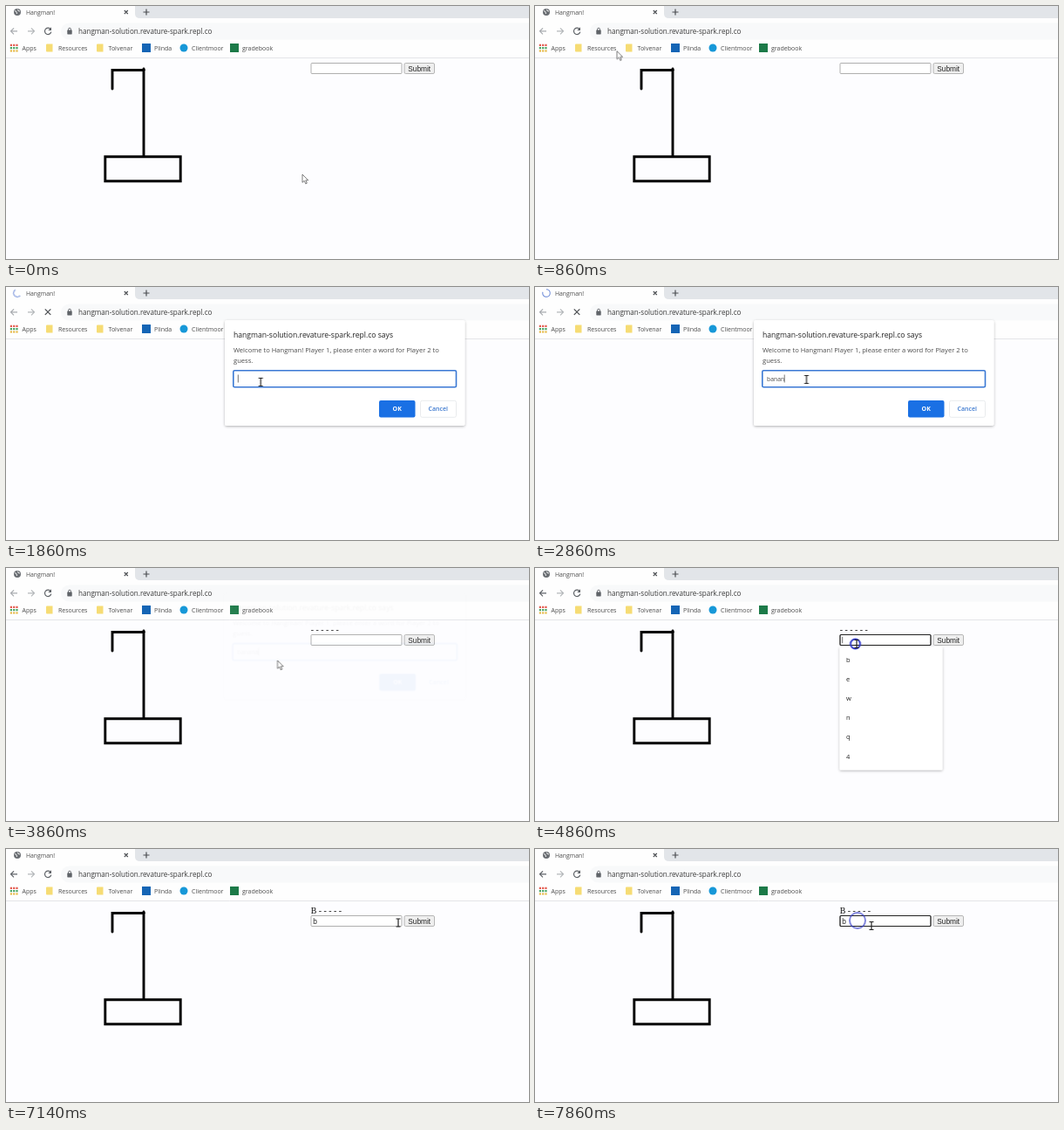
An HTML page for the animation above (8000 ms loop, 600x290 px).

```html
<!DOCTYPE html>
<html lang="en">
<head>
<meta charset="utf-8">
<title>Hangman!</title>
<style>
html, body { margin: 0; width: 100%; height: 100%; overflow: hidden; background: #fdfdff; }
svg { display: block; width: 600px; height: 290px; }
text { font-family: "Open Sans", "Noto Sans", sans-serif; font-size: 7px; fill: #4c4c4c; white-space: pre; }
.line { fill: none; stroke: #5f6368; stroke-width: 1.2; }
.arial { font: 8.3px "Liberation Sans", Arial, sans-serif; fill: #222; }
.serif { font: 9.9px "Liberation Serif", Times, serif; fill: #111; }
.small { font-size: 7.5px; fill: #222; }

/* 56 steps of 1/7 s; hard changes unless a keyframe says otherwise */
.a { animation: 8s step-end infinite both; }
.idle { animation-name: idle; }
.busy { animation-name: busy; }
.page { animation-name: page; }
.form { animation-name: form; }
.back { animation-name: back; }
.dashes { animation-name: dashes; }
.hit { animation-name: hit; }
.focus { animation-name: focus; }
.menu { animation-name: menu; }
.guess { animation-name: guess; }
.hover { animation-name: hover; }
.press { animation-name: press; }
.dialog { animation-name: dialog; transform-origin: 389px 98px; }
.ok { animation-name: ok; }
.key { animation-name: key; animation-delay: calc(var(--i) * .142s); }
.caret { animation-name: caret; }
.spin { animation-name: spin; animation-timing-function: steps(56); transform-origin: 13px 7px; }
.arc { animation-name: arc; }
.mouse { animation-name: mouse; }
.arrow { animation-name: arrow; }
.beam { animation-name: beam; }
.ring { animation-name: ring; }

@keyframes idle { 0% { visibility: visible } 14.25% { visibility: hidden } 48.25%, 100% { visibility: visible } }
@keyframes busy { 0% { visibility: hidden } 14.25% { visibility: visible } 48.25%, 100% { visibility: hidden } }
@keyframes page { 0% { visibility: visible } 16.125% { visibility: hidden } 48.25%, 100% { visibility: visible } }
@keyframes form { 0% { transform: translateY(-11px) } 48.25%, 100% { transform: none } }
@keyframes back { 0% { stroke: #a8abaf } 57.125%, 100% { stroke: #5f6368 } }
@keyframes dashes { 0% { visibility: hidden } 48.25% { visibility: visible } 85.75%, 100% { visibility: hidden } }
@keyframes hit { 0% { visibility: hidden } 85.75%, 100% { visibility: visible } }
@keyframes focus {
  0% { visibility: hidden } 60.75% { visibility: visible }
  83.875% { visibility: hidden } 96.375%, 100% { visibility: visible }
}
@keyframes menu { 0% { visibility: hidden } 60.75% { visibility: visible } 67.875%, 100% { visibility: hidden } }
@keyframes guess { 0% { visibility: hidden } 67.875%, 100% { visibility: visible } }
@keyframes hover { 0% { fill: #efefef } 75% { fill: #e2e2e2 } 87.5%, 100% { fill: #efefef } }
@keyframes press { 0% { opacity: 0 } 12.5% { opacity: .1 } 17.875%, 100% { opacity: 0 } }
@keyframes dialog {
  0% { opacity: 0; transform: none }
  16.125% { opacity: .53; transform: translateY(-5px) scale(1.006) }
  17.875% { opacity: 1; transform: none }
  46.375% { opacity: .45; transform: translateY(-4px) }
  48.25% { opacity: .05; transform: translateY(-9px) scale(1.006) }
  50%, 100% { opacity: 0; transform: none }
}
@keyframes ok { 0% { fill: #1a70e4 } 42.875%, 100% { fill: #1a64cc } }
@keyframes key { 0% { visibility: hidden } 28.625%, 100% { visibility: visible } }
@keyframes caret {
  0% { transform: none }
  26.75% { transform: none; animation-timing-function: steps(6) }
  37.5%, 100% { transform: translateX(23.8px) }
}
@keyframes spin { from { transform: rotate(-24.5deg) } to { transform: rotate(1808deg) } }
@keyframes arc {
  0% { stroke-dasharray: 11 30 }
  16.125% { stroke-dasharray: 11 30; animation-timing-function: steps(11) }
  35.75% { stroke-dasharray: 21 30; animation-timing-function: steps(7) }
  48.25%, 100% { stroke-dasharray: 11 30 }
}
@keyframes mouse {
  0% { transform: translate(340px, 193px); animation-timing-function: steps(7) }
  12.5% { transform: translate(53px, 28px) }
  16.125% { transform: translate(215px, 120.500px); animation-timing-function: steps(5) }
  25% { transform: translate(311.5px, 106px) }
  53.625% { transform: translate(311.5px, 106px); animation-timing-function: steps(4) }
  60.75% { transform: translate(369px, 87px); animation-timing-function: steps(2) }
  64.25% { transform: translate(475px, 93px) }
  66.125% { transform: translate(475px, 93px); animation-timing-function: steps(6) }
  76.75% { transform: translate(466px, 85px) }
  85.75% { transform: translate(466px, 85px); animation-timing-function: steps(6) }
  96.375% { transform: translate(370px, 82px) }
  98.25%, 100% { transform: translate(386px, 88px) }
}
@keyframes beam {
  0% { visibility: hidden } 21.375% { visibility: visible } 46.375% { visibility: hidden }
  60.75% { visibility: visible } 62.5% { visibility: hidden } 87.5%, 100% { visibility: visible }
}
@keyframes arrow {
  0% { visibility: visible } 21.375% { visibility: hidden } 46.375% { visibility: visible }
  60.75% { visibility: hidden } 62.5% { visibility: visible } 87.5%, 100% { visibility: hidden }
}
@keyframes ring {
  0% { opacity: 0 }
  14.25% { opacity: 1; r: 5.5px; transform: translate(53px, 28px) }
  16.125% { opacity: .6; r: 9px; transform: translate(52.5px, 28px) }
  17.875% { opacity: 0 }
  60.75% { opacity: 1; r: 5.5px; transform: translate(367.5px, 87px) }
  62.5% { opacity: .6; r: 9px; transform: translate(367.5px, 87px) }
  64.25% { opacity: 0 }
  83.875% { opacity: 1; r: 5.5px; transform: translate(467px, 87px) }
  85.75% { opacity: .6; r: 9px; transform: translate(467px, 87px) }
  87.5% { opacity: 0 }
  96.375% { opacity: 1; r: 5.5px; transform: translate(370px, 82px) }
  98.25%, 100% { opacity: .6; r: 9px; transform: translate(370px, 82px) }
}
</style>
</head>
<body>
<svg viewBox="0 0 600 290">
  <defs>
    <filter id="shade" x="-10%" y="-10%" width="120%" height="125%">
      <feDropShadow dx="0" dy="1" stdDeviation="1.6" flood-opacity=".3"/>
    </filter>
    <path id="folder" d="M0 1.5a1 1 0 0 1 1-1h6.500v9h-6.500a1 1 0 0 1-1-1z" fill="#f6dc74"/>
  </defs>

  <!-- browser window -->
  <rect width="600" height="290" fill="#fdfdff"/>
  <rect width="600" height="60" fill="#fefefe"/>
  <path d="M148 0H600V14H154Q148 14 148 9z" fill="#e2e5e9"/>
  <g class="a idle">
    <circle cx="13" cy="7" r="4" fill="#6a6e73"/>
    <path d="M10 5.500l2 1 .5 2.500M13.500 3.800l.5 1.700 2 .5" fill="none" stroke="#fff" stroke-width=".9"/>
  </g>
  <g class="a busy">
    <g class="a spin">
      <circle class="a arc" cx="13" cy="7" r="4.300" fill="none" stroke="#6f8cd8" stroke-width="1.100"/>
    </g>
  </g>
  <text x="23" y="9.700" style="font-size:6.850px">Hangman!</text>
  <path class="line" d="M135.800 5l4 4m0-4l-4 4M157.500 7h7m-3.500-3.500v7" style="stroke:#4a4d51"/>

  <rect x="63" y="19.500" width="560" height="19" rx="9.500" fill="#f8f9fa"/>
  <path class="line a back" d="M13 28.800H5.500M9 25.300l-3.500 3.500 3.500 3.500"/>
  <path class="line" d="M25 28.800h7.500M29 25.300l3.500 3.500-3.500 3.500" style="stroke:#b4b7ba"/>
  <circle class="a press" cx="48" cy="28.500" r="8.500"/>
  <g class="a idle">
    <path class="line" d="M50.800 26.200a3.700 3.700 0 1 0 1 3.500"/>
    <path d="M52 24.300v3.700h-3.700z" fill="#5f6368"/>
  </g>
  <path class="line a busy" d="M44.800 25.300l6.500 6.500m0-6.500l-6.500 6.500" style="stroke:#4a4d51"/>
  <rect x="70.300" y="27.600" width="5.400" height="4.800" rx=".6" fill="#5f6368"/>
  <path class="line" d="M71.500 28v-1.300a1.500 1.500 0 0 1 3 0v1.300" style="stroke-width:.9"/>
  <text x="83" y="31.800" style="font-size:8.070px;fill:#3a3a3a">hangman-solution.revature-spark.repl.co</text>

  <g fill="none" stroke-width="2.200" stroke-dasharray="2.200 1.100">
    <path d="M4.800 44.900h9" stroke="#e35b4f"/>
    <path d="M4.800 48.200h9" stroke="#4aa564"/>
    <path d="M4.800 51.500h9" stroke="#e5b53c"/>
  </g>
  <use href="#folder" x="46" y="43"/>
  <use href="#folder" x="104" y="43"/>
  <rect x="156" y="43" width="10" height="10" fill="#1565b5"/>
  <circle cx="204" cy="48" r="4.500" fill="#1798d8"/>
  <rect x="257" y="43" width="10" height="10" fill="#1c7a48"/>
  <g>
    <text x="18.500" y="50.700">Apps</text>
    <text x="60" y="50.700">Resources</text>
    <text x="117.500" y="50.700">Tolvenar</text>
    <text x="170" y="50.700">Plinda</text>
    <text x="213" y="50.700">Clientmoor</text>
    <text x="271" y="50.700">gradebook</text>
  </g>
  <path d="M0 59.500H600" stroke="#e4e5e8"/>

  <!-- game page -->
  <g class="a page">
    <path d="M122 95V73.500H158.500M158 72V172M113.800 172.800H200.200V200.800H113.800z"
      fill="none" stroke="#000" stroke-width="2.900" stroke-linecap="round"/>
    <g class="a form">
      <rect x="350" y="76.500" width="104" height="12" rx="1" fill="#fff" stroke="#a6a6a6" stroke-width=".9"/>
      <rect class="a hover" x="457" y="76.500" width="34.500" height="12" rx="1.500" stroke="#a6a6a6" stroke-width=".8"/>
      <text class="arial" x="461.300" y="85.500">Submit</text>
    </g>
  </g>
  <text class="serif a dashes" x="349.700" y="74">- - - - - -</text>
  <text class="serif a hit" x="349.700" y="74">B - - - - -</text>
  <rect class="a focus" x="350" y="76.500" width="104" height="12" rx="1" fill="none" stroke="#222" stroke-width="1.200"/>
  <text class="arial a guess" x="352.300" y="85.700">b</text>
  <g class="a menu">
    <path d="M352.700 78.800v7.500" stroke="#333" stroke-width=".7"/>
    <rect x="349.500" y="90" width="118" height="141.500" rx="1.500" fill="#fff" filter="url(#shade)"/>
    <text class="small" x="357" y="108">b</text>
    <text class="small" x="357" y="130.100">e</text>
    <text class="small" x="357" y="152.200">w</text>
    <text class="small" x="357" y="174.300">n</text>
    <text class="small" x="357" y="196.400">q</text>
    <text class="small" x="357" y="218.500">4</text>
  </g>

  <!-- prompt -->
  <g class="a dialog">
    <rect x="251" y="38" width="275.500" height="121" rx="2.500" fill="#fff" filter="url(#shade)"/>
    <text x="261" y="57.800" style="font-size:8.610px;fill:#222">hangman-solution.revature-spark.repl.co says</text>
    <text x="261" y="74.500" style="font-size:7.580px">Welcome to Hangman! Player 1, please enter a word for Player 2 to</text>
    <text x="261" y="87" style="font-size:7.580px">guess.</text>
    <rect x="260.800" y="95.700" width="255.700" height="19" rx="1.500" fill="#fff" stroke="#3a78d4" stroke-width="1.600"/>
    <text x="266" y="107.800" style="font-size:6.800px"><tspan class="a key" style="--i:0">b</tspan><tspan class="a key" style="--i:1">a</tspan><tspan class="a key" style="--i:2">n</tspan><tspan class="a key" style="--i:3">a</tspan><tspan class="a key" style="--i:4">n</tspan><tspan class="a key" style="--i:5">a</tspan></text>
    <path class="a caret" d="M266.300 100.500v9" stroke="#333" stroke-width=".7"/>
    <rect class="a ok" x="428" y="130" width="41.500" height="19.500" rx="2"/>
    <text x="448.700" y="142.300" text-anchor="middle" style="fill:#fff;font-weight:700">OK</text>
    <rect x="475.500" y="130.300" width="41" height="19" rx="2" fill="#fff" stroke="#e4e6e9" stroke-width=".8"/>
    <text x="495.700" y="142.300" text-anchor="middle" style="fill:#3b78cf;font-weight:600">Cancel</text>
  </g>

  <!-- pointer -->
  <circle class="a ring" r="5.500" fill="none" stroke="#3038c8" stroke-width="2"/>
  <g class="a mouse">
    <path class="a arrow" d="M0 0V9.300L2.200 7.300 3.800 10.800 5.300 10.100 3.800 6.800H6.700z" fill="#fff" stroke="#5c5c5c" stroke-width=".8"/>
    <path class="a beam" d="M-2.500-4.500h5M0-4.500v9M-2.500 4.500h5" fill="none" stroke="#222" stroke-width="1.200"/>
  </g>
</svg>
</body>
</html>
```
